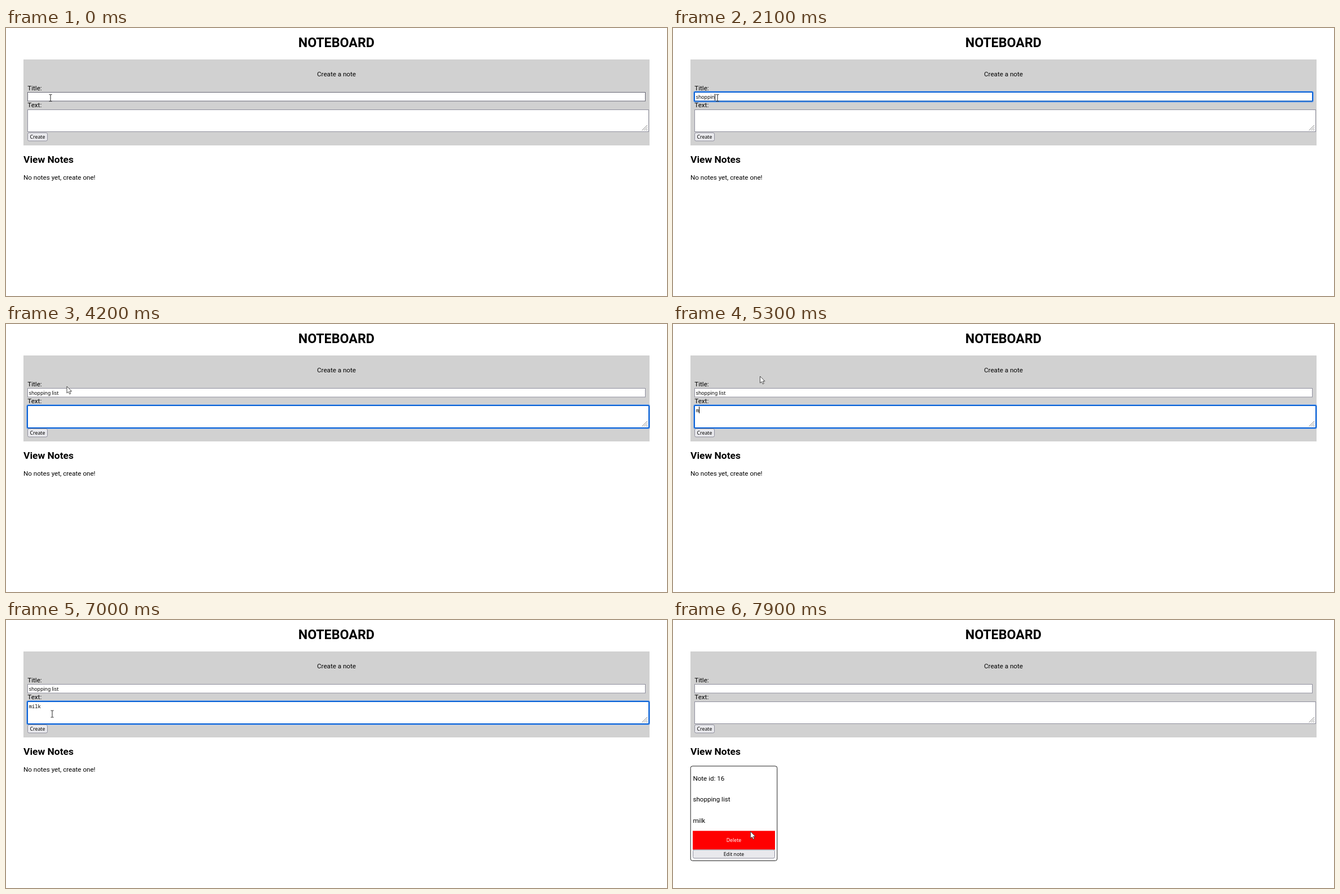
Write an HTML page that moves like this. It is 1173 px wide and 477 px high and loops after 8000 ms.

```html
<!DOCTYPE html>
<html lang="en">
<head>
<meta charset="utf-8">
<title>Noteboard</title>
<style>
html, body { margin: 0; width: 100%; height: 100%; overflow: hidden; background: #fff; }
svg { display: block; }
text { font: 11.62px Roboto, sans-serif; white-space: pre; }
.h1 { font-size: 23.23px; font-weight: 700; }
.h2 { font-size: 17.42px; font-weight: 700; }
.ui { font: 8.71px "Noto Sans", sans-serif; }
.mono { font: 8.71px "Noto Sans Mono", monospace; }
.mid { text-anchor: middle; }
.field { fill: #fff; stroke: #8f8f9d; }
.button { fill: #e9e9ed; stroke: #8f8f9d; }
.hover { stroke: #676774; }
.button.hover { fill: #d0d0d7; }
.ring rect { fill: none; stroke: #0a62d6; stroke-width: 2; }
.ring .halo { stroke: #8db4ea; stroke-width: 1; }
</style>
</head>
<body>
<svg width="1173" height="477" viewBox="0 0 1173 477">
  <text class="h1 mid" x="586.3" y="34.3">NOTEBOARD</text>
  <rect x="31" y="56" width="1111" height="153" fill="#d1d1d1"/>
  <text class="mid" x="586.5" y="86">Create a note</text>
  <text x="38.3" y="111.3">Title:</text>
  <rect id="titleBox" class="field" x="38.5" y="114.5" width="1096" height="15.5"/>
  <g id="titleRing" class="ring">
    <rect class="halo" x="36.5" y="112.5" width="1100" height="19.5" rx="2"/>
    <rect x="38" y="114" width="1097" height="16.5" rx="1"/>
  </g>
  <text x="38.3" y="141.4">Text:</text>
  <rect class="field" x="38.5" y="145.5" width="1102" height="39"/>
  <g id="bodyRing" class="ring">
    <rect class="halo" x="36.5" y="143.5" width="1106" height="43" rx="2"/>
    <rect x="38" y="145" width="1103" height="40" rx="1"/>
  </g>
  <path d="M1128.5 182.5l9.5-9.5M1132 182.5l6-6M1135.5 182.5l2.5-2.5" stroke="#777" stroke-width=".9"/>
  <rect id="create" class="button" x="38.5" y="186.5" width="35" height="14.5" rx="2.5"/>
  <text class="ui mid" x="56" y="197.1">Create</text>
  <text id="title" class="ui" x="40.8" y="125.8"></text>
  <text id="body" class="mono" x="40.8" y="156.7"></text>
  <rect id="caret" width="1" height="12"/>

  <text class="h2" x="31" y="240.4">View Notes</text>
  <text id="empty" x="31" y="270.2">No notes yet, create one!</text>
  <g id="note">
    <rect x="31.2" y="260" width="153.6" height="168.5" rx="3.5" fill="#fff" stroke="#222"/>
    <text x="35.4" y="286.2">Note id: 16</text>
    <text x="35.4" y="323.4">shopping list</text>
    <text x="35.4" y="360.6">milk</text>
    <rect x="35" y="375.3" width="146" height="33.4" fill="#f00"/>
    <text class="ui mid" x="108" y="395.2" fill="#fff">Delete</text>
    <rect class="button" x="35.5" y="409" width="145" height="15" rx="2.5"/>
    <text class="ui mid" x="108" y="420">Edit note</text>
  </g>

  <path id="beam" d="M-2.5 -5.5H-.7L0 -5L.7 -5.5H2.5M0 -5V6M-2.5 6.5H-.7L0 6L.7 6.5H2.5" fill="none" stroke="#222"/>
  <path id="arrow" d="M0 0V12L2.8 9.6L4.8 13.8L6.8 12.9L4.9 8.8H8.6Z" fill="#fff" stroke="#333" stroke-width=".9"/>
</svg>
<script>
const $ = id => document.getElementById(id);
const show = (id, on) => $(id).style.display = on ? "" : "none";

const LOOP = 8000, TICK = 100, BLINK = 500;
const TITLE_FOCUS = 300, BODY_FOCUS = 3400, BLUR = 7200, SAVED = 7500;
const titleKeys = [900, 1100, 1300, 1500, 1700, 1900, 2000, 2200, 2300, 2500, 2600, 2700, 2800];
const bodyKeys = [5100, 5400, 5700, 6000];

// Pointer path: time, x, y
const path = [
  [4000, 79, 124], [4100, 88, 120], [4200, 108, 111], [4300, 134, 100],
  [4500, 154.5, 93], [6500, 154.5, 93], [6800, 118, 128], [7100, 64, 186],
  [7200, 60.5, 190.5], [7500, 60.5, 190.5], [7700, 105, 310], [7900, 137.5, 376.5]
];

function pointer(t) {
  const i = path.findIndex(p => p[0] > t);
  if (i === 0) return path[0].slice(1);
  if (i < 0) return path[path.length - 1].slice(1);
  const a = path[i - 1], b = path[i], f = (t - a[0]) / (b[0] - a[0]);
  return [a[1] + (b[1] - a[1]) * f, a[2] + (b[2] - a[2]) * f];
}

const typed = (text, keys, t) => text.slice(0, keys.filter(k => k <= t).length);

function drawCaret(t, inTitle, inBody) {
  const keys = inTitle ? titleKeys : bodyKeys;
  const start = inTitle ? TITLE_FOCUS : BODY_FOCUS - TICK;
  const last = keys.filter(k => k <= t).pop();
  // The blink restarts after each key
  const since = t - (last ? last + TICK : start);
  const on = since < 0 || Math.floor(since / BLINK) % 2 === 0;
  show("caret", (inTitle || inBody) && on && !(inTitle && t >= 3100));
  const line = $(inTitle ? "title" : "body");
  const width = line.textContent ? line.getComputedTextLength() : 0;
  $("caret").setAttribute("x", Math.round(40.8 + width - .3));
  $("caret").setAttribute("y", inTitle ? 117 : 147);
}

function draw(t) {
  const saved = t >= SAVED;
  const inTitle = t >= TITLE_FOCUS && t < BODY_FOCUS - TICK;
  const inBody = t >= BODY_FOCUS - TICK && t < BLUR;
  const [x, y] = pointer(t);

  $("title").textContent = saved ? "" : typed("shopping list", titleKeys, t);
  $("body").textContent = saved ? "" : typed("milk", bodyKeys, t);
  show("titleRing", inTitle);
  show("bodyRing", inBody);
  drawCaret(t, inTitle, inBody);

  const overTitle = y > 114 && y < 131;
  const overText = overTitle || (y > 145 && y < 185);
  $("titleBox").classList.toggle("hover", overTitle);
  $("create").classList.toggle("hover", x < 74 && y > 186 && y < 202);
  show("beam", overText);
  show("arrow", !overText);
  $(overText ? "beam" : "arrow").setAttribute("transform", `translate(${x} ${y})`);

  show("empty", !saved);
  show("note", saved);
}

const begin = performance.now();
function frame() {
  const t = (performance.now() - begin) % LOOP;
  draw(Math.floor(t / TICK) * TICK);
  requestAnimationFrame(frame);
}
frame();
</script>
</body>
</html>
```
